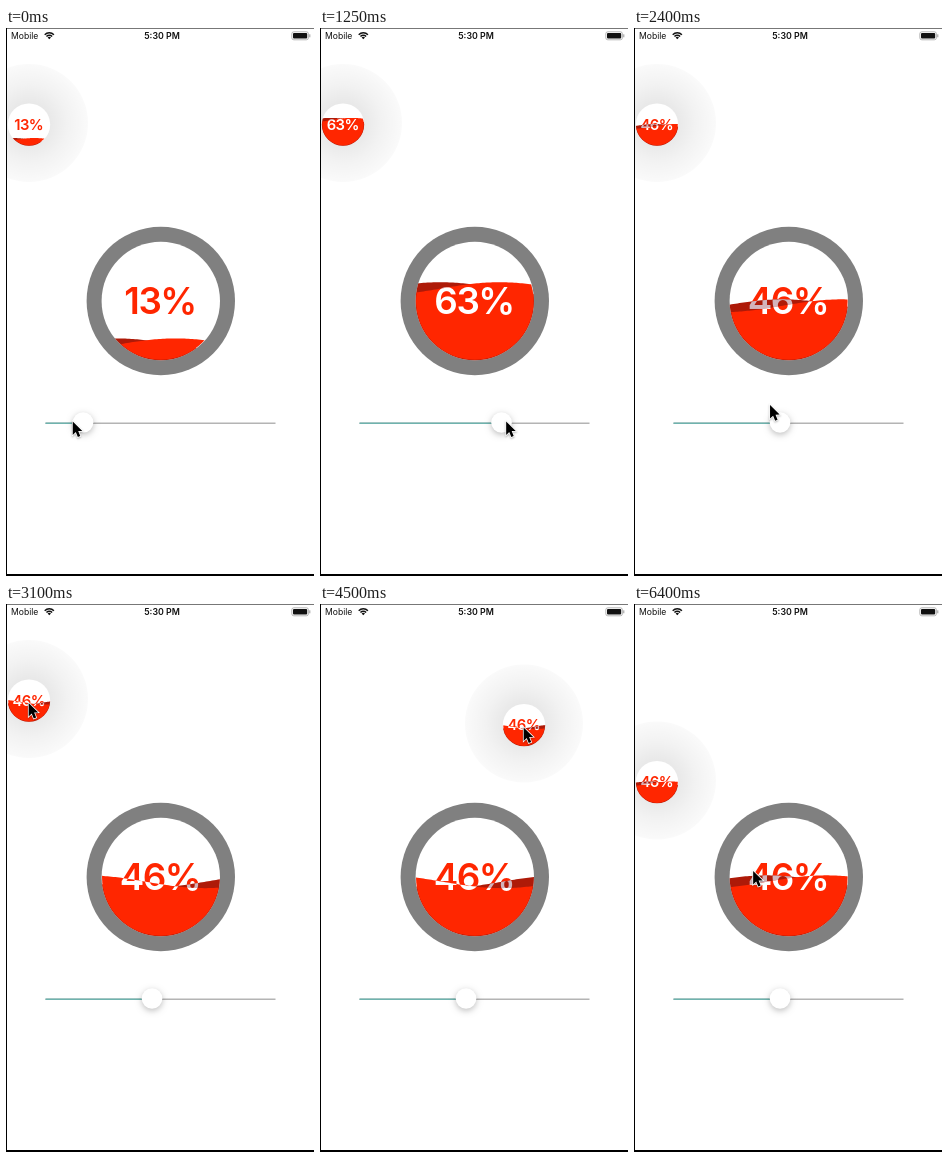
An HTML page with a canvas for the animation above (6.45 s loop, 308x548 px).

```html
<!DOCTYPE html>
<html lang="en">
<head>
<meta charset="utf-8">
<title>Liquid progress</title>
<style>
html, body { margin: 0; width: 100%; height: 100%; overflow: hidden; background: #fff; }
canvas { display: block; width: 308px; height: 548px; }
</style>
</head>
<body>
<canvas id="stage"></canvas>
<script>
const W = 308, H = 548, LOOP = 6450, STEP = 50;
const RED = '#ff2600', DARK = '#ae1a08', INK = '#111';
const FONT = 'Inter, "Liberation Sans", sans-serif';
const canvas = document.getElementById('stage');
const ctx = canvas.getContext('2d');
const ratio = window.devicePixelRatio || 1;
canvas.width = W * ratio;
canvas.height = H * ratio;

const clamp = u => Math.max(0, Math.min(1, u));
const mix = (a, b, f) => a + (b - a) * f;

// Smooth step from 0 to 1 between two times.
function ramp(t, from, to) {
  const u = clamp((t - from) / (to - from));
  return u * u * (3 - 2 * u);
}

// Slider is dragged up to 76 % and back to 46 %.
const percent = t => 13 + 63 * clamp(t / 1500) ** 1.27 - 30 * ramp(t, 1550, 2300);
const knobX = t => 49.9 + 2.09 * percent(t);

// Bubble is dragged across, snaps to the right edge, then returns to the left one.
function bubbleAt(t) {
  const across = ramp(t, 3690, 4450), snap = ramp(t, 4650, 5050), back = ramp(t, 5350, 6020);
  return {
    x: 23 + 181 * across + 82 * snap - 263 * back,
    y: 97 + 24.5 * across - 18 * Math.sin(Math.PI * across) + 57 * back
  };
}

function cursorAt(t) {
  const bubble = bubbleAt(t);
  const grab = ramp(t, 2300, 3000), leave = ramp(t, 5800, 6400);
  const slideX = knobX(t) - 11 + 15 * ramp(t, 0, 400) - 8 * ramp(t, 1500, 1800);
  const dragX = bubble.x - 1 - 11 * ramp(t, 4650, 5050);
  return {
    x: mix(mix(slideX, dragX, grab), 118.5, leave),
    y: mix(mix(392.5, bubble.y + 1, grab), 266, leave)
  };
}

function disc(x, y, r) {
  ctx.beginPath();
  ctx.arc(x, y, r, 0, 2 * Math.PI);
}

function circle(x, y, r, fill) {
  disc(x, y, r);
  ctx.fillStyle = fill;
  ctx.fill();
}

function label(text, x, y, size, color, weight = 600, align = 'center') {
  ctx.font = `${weight} ${size}px ${FONT}`;
  ctx.textAlign = align;
  ctx.fillStyle = color;
  ctx.fillText(text, x, y);
}

// Liquid disc of radius r; the label changes colour under each wave.
function liquid(cx, cy, r, t, size) {
  const text = Math.round(percent(t)) + '%';
  const base = cy + r - percent(t - 50) / 100 * 2 * r;
  const trough = (1.75 - t / 1305 * 4) * r;
  const write = color => {
    ctx.letterSpacing = -0.04 * size + 'px';
    label(text, cx - 0.02 * size, cy + size * 0.364, size, color);
    ctx.letterSpacing = '0px';
  };

  circle(cx, cy, r, '#fff');
  write(RED);
  for (const [side, fill, ink] of [[1, DARK, '#d3b4bb'], [-1, RED, '#fff']]) {
    ctx.save();
    disc(cx, cy, side > 0 ? r : r - 0.4);
    ctx.clip();
    ctx.beginPath();
    for (let i = -31; i <= 31; i++) {
      const x = i / 30 * r;
      const phase = (x - trough) * Math.PI / (2 * r) + side * Math.PI / 4;
      ctx.lineTo(cx + x, base + 0.108 * r * Math.cos(phase));
    }
    ctx.lineTo(cx + 2 * r, cy + 2 * r);
    ctx.lineTo(cx - 2 * r, cy + 2 * r);
    ctx.closePath();
    ctx.fillStyle = fill;
    ctx.fill();
    ctx.clip();
    write(ink);
    ctx.restore();
  }
}

function statusBar() {
  label('Mobile', 5, 11.3, 8.6, INK, 400, 'left');
  label('5:30 PM', 156, 11.3, 8.8, INK);

  ctx.strokeStyle = ctx.fillStyle = INK;
  ctx.lineWidth = 1.5;
  const fan = r => {
    ctx.beginPath();
    ctx.arc(43.3, 11.3, r, -Math.PI * 0.75, -Math.PI * 0.25);
  };
  for (const r of [4, 6.5]) {
    fan(r);
    ctx.stroke();
  }
  fan(2.4);
  ctx.lineTo(43.3, 11.3);
  ctx.fill();

  ctx.beginPath();
  ctx.roundRect(287, 5, 14.2, 5.6, 1);
  ctx.fill();
  ctx.lineWidth = 0.7;
  ctx.strokeStyle = ctx.fillStyle = '#999';
  ctx.beginPath();
  ctx.roundRect(285.8, 3.8, 16.6, 8, 2);
  ctx.stroke();
  ctx.fillRect(303.3, 6.3, 1, 3);
}

function slider(t) {
  const x = knobX(t);
  ctx.fillStyle = '#b4b4b4';
  ctx.fillRect(39.5, 394.5, 230, 1.5);
  ctx.fillStyle = '#6fb3ae';
  ctx.fillRect(39.5, 394.5, x - 39.5, 1.5);
  ctx.save();
  ctx.shadowColor = 'rgba(0,0,0,.26)';
  ctx.shadowBlur = 6 * ratio;
  ctx.shadowOffsetY = 2 * ratio;
  circle(x, 394.5, 10.3, '#fff');
  ctx.restore();
}

function bubble(t) {
  const { x, y } = bubbleAt(t);
  const glow = ctx.createRadialGradient(x, y - 2, 18, x, y - 2, 59);
  glow.addColorStop(0, 'rgba(0,0,0,.095)');
  glow.addColorStop(0.5, 'rgba(0,0,0,.05)');
  glow.addColorStop(1, 'rgba(0,0,0,.018)');
  circle(x, y - 2, 59, glow);
  liquid(x, y - 0.4, 21.2, t, 14.8);
}

function cursor(t) {
  const { x, y } = cursorAt(t);
  const arrow = new Path2D('M.7 1V15.5L4 12.4L6.2 17.8L8.8 16.7L6.6 11.4L11 11.2Z');
  ctx.save();
  ctx.translate(x, y);
  ctx.scale(0.93, 0.93);
  ctx.lineWidth = 1.6;
  ctx.strokeStyle = '#fff';
  ctx.fillStyle = '#000';
  ctx.shadowColor = 'rgba(0,0,0,.3)';
  ctx.shadowBlur = 2 * ratio;
  ctx.shadowOffsetY = ratio;
  ctx.stroke(arrow);
  ctx.shadowColor = 'transparent';
  ctx.fill(arrow);
  ctx.restore();
}

function border() {
  ctx.fillStyle = '#777';
  ctx.fillRect(0, 0, W, 1);
  ctx.fillStyle = '#000';
  ctx.fillRect(0, 0, 1, H);
  ctx.fillRect(0, H - 2, W, 2);
}

function draw(t) {
  ctx.setTransform(ratio, 0, 0, ratio, 0, 0);
  ctx.fillStyle = '#fff';
  ctx.fillRect(0, 0, W, H);
  statusBar();
  circle(154.8, 273, 74.2, '#808080');
  liquid(154.8, 273, 59.2, t, 36.8);
  slider(t);
  bubble(t);
  cursor(t);
  border();
}

const start = performance.now();
function frame() {
  const t = (performance.now() - start) % LOOP;
  draw(Math.floor(t / STEP) * STEP);
  requestAnimationFrame(frame);
}
frame();
</script>
</body>
</html>
```
